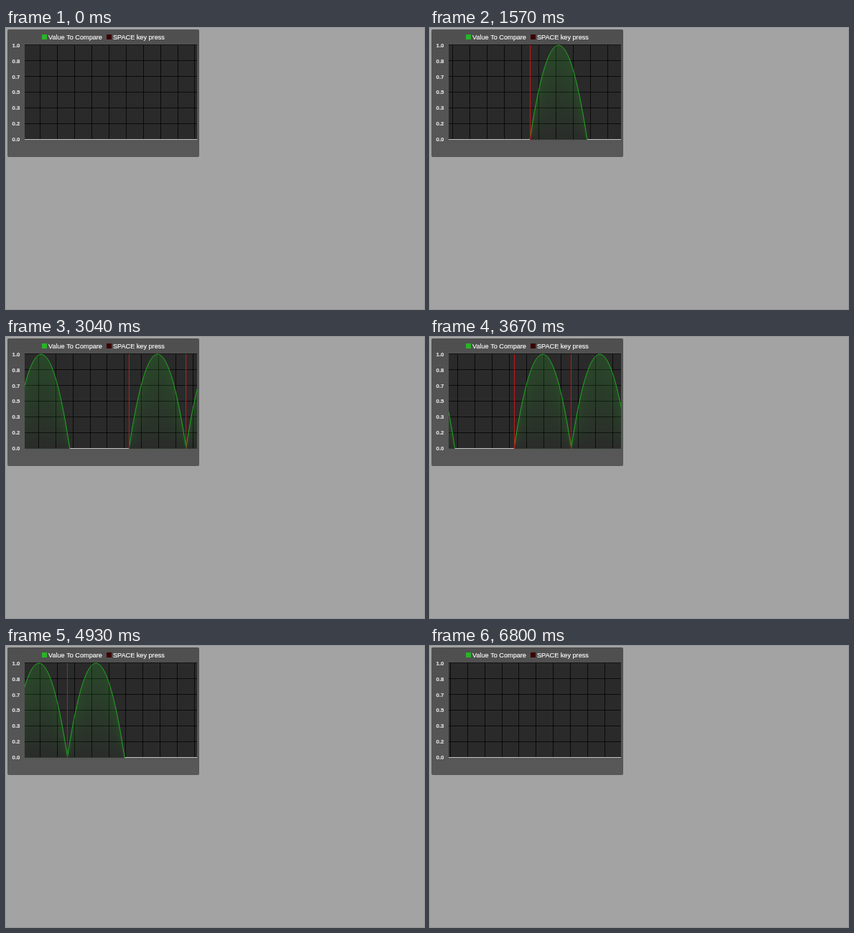
Write an HTML page with a canvas that moves like this. It is 582x392 px and loops after 6830 ms.

```html
<!DOCTYPE html>
<html>
<head>
<meta charset="utf-8">
<style>
html, body { margin: 0; width: 100%; height: 100%; overflow: hidden; background: #a3a3a3; }
canvas { display: block; }
</style>
</head>
<body>
<canvas id="stage" width="582" height="392"></canvas>
<script>
const c = document.getElementById('stage').getContext('2d');
const LOOP = 6830, STEP = 2.708, GAP = 23.9, PULSE = 79.7;
const LEFT = 26, RIGHT = 266, TOP = 24, BASE = 155.5;
const PRESSES = [274.5, 436.6, 516];
const GRID = 'rgba(0,0,0,.75)';
// [time in ms, scroll step]: the chart advances in slightly uneven ticks
const TICKS = [[0, 0], [690, 22], [1420, 45], [2120, 68], [2830, 91], [3520, 113], [4220, 136],
  [4930, 159], [5620, 181], [6330, 204], [6800, 219], [6830, 220]];
const FONT = '"Liberation Sans", Arial, sans-serif';

function scrollAt(t) {
  const i = TICKS.findIndex(k => k[0] > t);
  const [t0, n0] = TICKS[i - 1], [t1, n1] = TICKS[i];
  return STEP * Math.floor(n0 + (n1 - n0) * (t - t0) / (t1 - t0) + 0.35);
}

function rect(x, y, w, h, color) {
  c.fillStyle = color;
  c.fillRect(x, y, w, h);
}

// One pixel wide vertical line on the pixel grid
function vline(x, color) {
  rect(Math.floor(x), TOP, 1, 132, color);
}

function text(str, x, y, font, color) {
  c.font = font + ' ' + FONT;
  c.fillStyle = c.strokeStyle = color;
  c.lineWidth = 0.15;
  c.fillText(str, x, y);
  c.strokeText(str, x, y);
}

function pulseY(u) {
  return BASE - (BASE - TOP) * Math.max(0, 4 * u * (1 - u));
}

function drawPanel() {
  rect(0, 0, 582, 392, '#a3a3a3');
  const g = c.createLinearGradient(0, 2, 0, 180);
  g.addColorStop(0, '#4f4f4f');
  g.addColorStop(1, '#585858');
  c.fillStyle = g;
  c.beginPath();
  c.roundRect(2, 2, 267, 178, 2);
  c.fill();
  rect(50, 9, 7, 7, '#28b428');
  text('Value To Compare', 59, 15.8, '9.15px', '#fff');
  rect(140, 9, 7, 7, '#3c0000');
  text('SPACE key press', 149, 15.8, '9.15px', '#fff');
  ['1.0', '0.8', '0.7', '0.5', '0.3', '0.2', '0.0'].forEach((s, i) =>
    text(s, 8.6, 26.6 + i * 21.95, 'bold 7.8px', '#e2e2e2'));
}

function drawPulse(x) {
  const from = Math.max(LEFT, Math.floor(x)), to = Math.min(RIGHT, x + PULSE);
  for (let px = from; px < to; px++) {
    const y = pulseY((px + 0.5 - x) / PULSE);
    const g = c.createLinearGradient(0, y, 0, BASE + 0.5);
    g.addColorStop(0, 'rgba(40,180,40,.21)');
    g.addColorStop(1, 'rgba(40,180,40,.01)');
    rect(px, y, 1, BASE - y, g);
  }
  c.strokeStyle = '#20bc20';
  c.lineWidth = 0.85;
  c.beginPath();
  for (let i = 0; i <= 60; i++) c.lineTo(x + PULSE * i / 60, pulseY(i / 60));
  c.stroke();
}

function drawPlot(scroll) {
  c.save();
  c.beginPath();
  c.rect(LEFT, 23, RIGHT - LEFT, 133);
  c.clip();
  rect(LEFT, TOP, RIGHT - LEFT, 132, '#2a2a2a');
  for (let y = 23; y < 150; y += 22) rect(LEFT, y, 240, 1, GRID);
  const first = (((47.5 - LEFT - scroll) % GAP) + GAP) % GAP + LEFT;
  for (let x = first; x < RIGHT; x += GAP) vline(x + 0.3, GRID);
  rect(LEFT, 155, 240, 1, '#c4c4c4');
  const starts = PRESSES.map(p => p - scroll);
  for (const x of starts) rect(x, 155, PULSE, 1, '#2f382f');
  starts.forEach(drawPulse);
  for (const x of starts) vline(x, '#c81616');
  c.restore();
}

function frame() {
  drawPanel();
  drawPlot(scrollAt(performance.now() % LOOP));
  requestAnimationFrame(frame);
}
frame();
</script>
</body>
</html>
```
